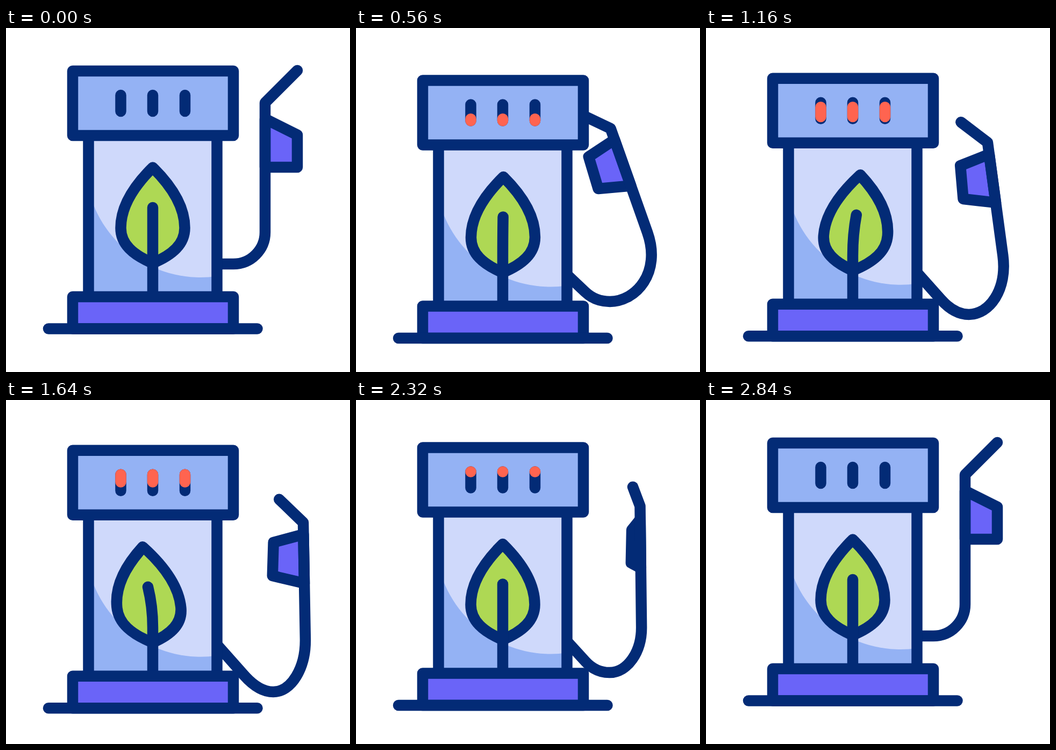
An HTML page for the animation above (3000 ms loop, 640x640 px).

```html
<!DOCTYPE html>
<html lang="en">
<head>
<meta charset="utf-8">
<title>Eco fuel pump</title>
<style>
  html, body { margin: 0; width: 100%; height: 100%; overflow: hidden; background: #fff; }
  svg { display: block; width: 100%; height: 100%; }
  .ink { stroke: #032b76; stroke-width: 20.5; stroke-linecap: round; stroke-linejoin: round; }
  .line { fill: none; }
  .sky { fill: #94b2f4; }
  .pale { fill: #cfd9fb; }
  .violet { fill: #6a64f8; }
  .green { fill: #aed854; }
  #level { stroke: #ff6450; }
</style>
</head>
<body>
<svg viewBox="0 0 640 640">
  <path id="trigger" class="ink violet"/>
  <path id="hose" class="ink line"/>
  <g id="pump">
    <path class="sky" d="M153.5 200H392.5V500H153.5Z"/>
    <path class="pale" d="M153.5 200H392.5V461.8A214.5 214.5 0 0 1 153.5 300Z"/>
    <path class="ink line" d="M153.5 200V500M392.5 200V500"/>
    <path id="leaf" class="ink green" d="M273 259.5C240 292 213.5 331 213.5 372C213.5 402 236 422 273 437.5C310 422 332.5 402 332.5 372C332.5 331 306 292 273 259.5Z"/>
    <path id="stem" class="ink line"/>
    <path class="ink sky" d="M124 80H423V200H124Z"/>
    <path class="ink line" d="M213.5 125V155M273 125V155M333 125V155"/>
    <path id="level" class="ink line"/>
    <path class="ink violet" d="M124 500H423V559.5H124Z"/>
    <path class="ink line" d="M79 559.5H467.5"/>
  </g>
</svg>
<script>
const LOOP = 3000, STEP = 40;
const $ = id => document.getElementById(id);
const pump = $('pump'), leaf = $('leaf'), stem = $('stem');
const level = $('level'), hose = $('hose'), trigger = $('trigger');

// Elbow x, elbow y, lean (sine of the handle's angle), flip (0 right, 1 left)
const HOME = [482, 139, 0, 0];
const NEAR = [473.6, 187, .334, 1];
const FAR = [553, 228, .018, 1];

const mix = (a, b, k) => a.map((v, i) => v + (b[i] - v) * k);

// Eased 0 to 1 between two times
function ease(t, from, to) {
  const u = Math.min(1, Math.max(0, (t - from) / (to - from)));
  return u * u * (3 - 2 * u);
}

function drawPump(t, dy) {
  pump.setAttribute('transform', `translate(0 ${dy})`);

  const sway = 18.5 * ease(t, 480, 1000) - 37.3 * ease(t, 1000, 1700) + 18.8 * ease(t, 1700, 2220);
  const k = sway / 186;
  leaf.setAttribute('transform', `matrix(1 0 ${-k} 1 ${k * 446} 0)`);
  stem.setAttribute('d', `M${273 + .5 * sway} 334Q273 370 273 410V500`);

  const top = ease(t, 280, 1640), bottom = ease(t, 820, 2380);
  const bar = x => `M${x} ${155 - 30 * bottom}V${155 - 30 * top}`;
  level.setAttribute('d', top > 0 && bottom < 1 ? [213.5, 273, 333].map(bar).join('') : '');
}

function drawNozzle(t, dy) {
  let pose = mix(HOME, NEAR, ease(t, 120, 510));
  pose = mix(pose, FAR, ease(t, 700, 1480));
  pose = mix(pose, HOME, ease(t, 1980, 2840));
  const [x, y, lean, flip] = pose;
  const down = Math.sqrt(1 - lean * lean);
  // side: distance across the handle, along: distance down it
  const pt = (side, along) => [x + along * lean + side * down, y + along * down - side * lean];

  trigger.setAttribute('d', 'M' + [
    pt(0, 30 - 8 * flip),
    pt(60 - 116 * flip, 60 - 24 * flip),
    pt(60 - 119 * flip, 120 - 22 * flip),
    pt(0, 120 - 7 * flip)
  ].join('L') + 'Z');

  // The tip swings round the elbow, foreshortened halfway
  const turn = flip * (1 - flip);
  const tip = pt(60 - 104 * flip - 22 * turn, -60 + 16 * flip + 61 * turn);

  // The hose sags more as the handle leans
  const len = 241 - 24 * flip - 36 * lean;
  const end = pt(0, len);
  const sag = [end[0] - 59 - 32 * lean, end[1] + 59 + 38 * flip + 95 * lean];
  const c1 = pt(0, len + (.55 + .2 * lean) * (sag[1] - end[1]));
  const c2 = [sag[0] + .55 * (end[0] - sag[0]) + 30 * lean, sag[1]];
  const root = [393, 439 + dy + 3 * flip];
  const corner = [sag[0] - 24 - 3 * flip, sag[1]];
  const knee = mix(corner, root, .36);
  hose.setAttribute('d',
    `M${tip}L${x} ${y}L${end}C${c1} ${c2} ${sag}Q${corner} ${knee}L${root}`);
}

function frame() {
  const t = Math.floor(performance.now() % LOOP / STEP) * STEP;
  const dy = 18 * ease(t, 120, 610) - 4.3 * ease(t, 600, 860) - 13.7 * ease(t, 2000, 2760);
  drawPump(t, dy);
  drawNozzle(t, dy);
  requestAnimationFrame(frame);
}
frame();
</script>
</body>
</html>
```
